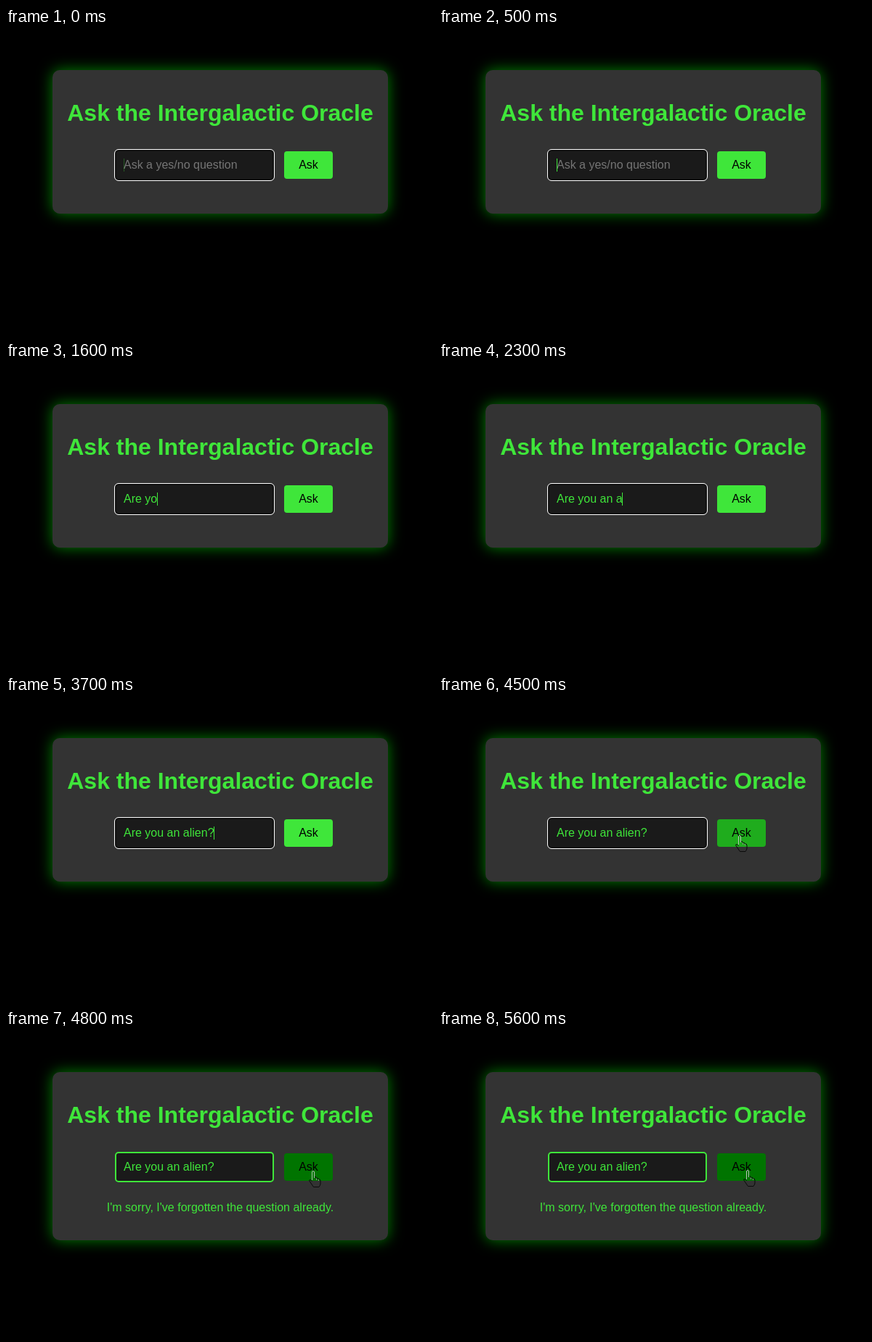
Recreate the animation shown at these times as an HTML page. Size 588x422 px, loop 5900 ms.

```html
<!DOCTYPE html>
<html lang="en">
<head>
<meta charset="utf-8">
<title>Intergalactic Oracle</title>
<style>
  :root { --neon: #3fe63a; --loop: 5900ms; }
  html, body { margin: 0; width: 100%; height: 100%; overflow: hidden; background: #000; }
  body { position: relative; font: 16px/18px "Liberation Sans", Arial, sans-serif; color: var(--neon); }
  body > * { position: absolute; box-sizing: border-box; margin: 0; white-space: pre; }

  .panel {
    left: 64px; top: 58px; width: 462px; height: 198px;
    border-radius: 10px; background: #333; box-shadow: 0 0 20px #008000;
    animation: grow var(--loop) step-end infinite;
  }
  h1 { left: 64px; top: 99.44px; width: 462px; font-size: 32px; line-height: 37px; text-align: center; }

  .field {
    left: 150px; top: 168px; width: 219px; height: 42px; padding: 10px;
    border: 2px solid #101010; border-radius: 5px; outline: 1px solid #fff;
    background: #1a1a1a; animation: blur var(--loop) step-end infinite;
  }
  .hint { color: #757575; }
  .caret { position: absolute; top: 10px; width: 1px; height: 18px; background: var(--neon); }

  .button {
    left: 383px; top: 170px; width: 67px; height: 38px; padding: 10px 0;
    border-radius: 4px; background: var(--neon); color: #000; text-align: center;
    animation: hover var(--loop) linear infinite;
  }
  .answer { left: 64px; top: 236px; width: 462px; text-align: center; animation: reveal var(--loop) step-end infinite; }
  .hand { left: 416px; top: 193px; animation: point var(--loop) step-end infinite; }

  @keyframes grow { 0% { height: 198px } 81.356%, 100% { height: 232px } }
  @keyframes blur {
    0% { border-color: #101010; outline-color: #fff }
    77.966%, 100% { border-color: var(--neon); outline-color: transparent }
  }
  @keyframes hover { 0%, 74.576% { background: var(--neon) } 77.966%, 100% { background: #007400 } }
  @keyframes reveal { 0% { opacity: 0 } 81.356%, 100% { opacity: 1 } }
  @keyframes point {
    0% { opacity: 0; transform: translate(-24px, -6px) }
    74.576% { opacity: 1; transform: translate(-24px, -6px) }
    76.271% { opacity: 1; transform: translate(-9px, -2px) }
    77.966% { opacity: 1; transform: none }
    88.136% { opacity: 1; transform: translate(1px, 0) }
    89.831%, 100% { opacity: 1; transform: translate(2px, -1px) }
  }
</style>
</head>
<body>
  <div class="panel"></div>
  <h1>Ask the Intergalactic Oracle</h1>
  <div class="field"><span id="text"></span><i class="caret" id="caret"></i></div>
  <div class="button">Ask</div>
  <div class="answer">I'm sorry, I've forgotten the question already.</div>
  <svg class="hand" width="20" height="26" fill="none" stroke-width="1">
    <path stroke="#0a0a0a" d="M8.5 11V9.5q3-.5 3 2 2.500-1 3 1.500 2.500-.5 2.500 2v4q0 2-2 4.500H7.500L2 15.500q-1-2 1-2l2.500 2"/>
    <path stroke="#b4c4b4" d="M5.500 14V3q0-1.500 1.500-1.500T8.500 3v8"/>
    <path stroke="#8a8a8a" d="M11.500 11.500v2.500M14.500 13v2"/>
  </svg>

<script>
  const LOOP = 5900;
  const question = "Are you an alien?";
  // [time in ms, characters typed]
  const keys = [[0, 0], [900, 1], [1000, 2], [1200, 3], [1300, 4], [1400, 5], [1600, 6], [1700, 7],
    [1900, 9], [2100, 11], [2300, 12], [2400, 14], [2500, 15], [2700, 16], [3700, 17]];
  // [start, end, opacity]
  const caretPhases = [[0, 100, .3], [100, 600, 1], [900, 3100, 1], [3700, 4200, 1]];

  const text = document.getElementById("text");
  const caret = document.getElementById("caret");
  const start = performance.now();

  function draw() {
    const t = (performance.now() - start) % LOOP;
    const count = keys.filter(([at]) => at <= t).pop()[1];
    const shown = count ? question.slice(0, count) : "Ask a yes/no question";
    if (text.textContent !== shown) {
      text.textContent = shown;
      text.className = count ? "" : "hint";
      const width = count ? text.getBoundingClientRect().width : 0;
      caret.style.left = 10 + Math.floor(width) + "px";
    }
    const phase = caretPhases.find(([from, to]) => t >= from && t < to);
    caret.style.opacity = phase ? phase[2] : 0;
    requestAnimationFrame(draw);
  }
  draw();
</script>
</body>
</html>
```
